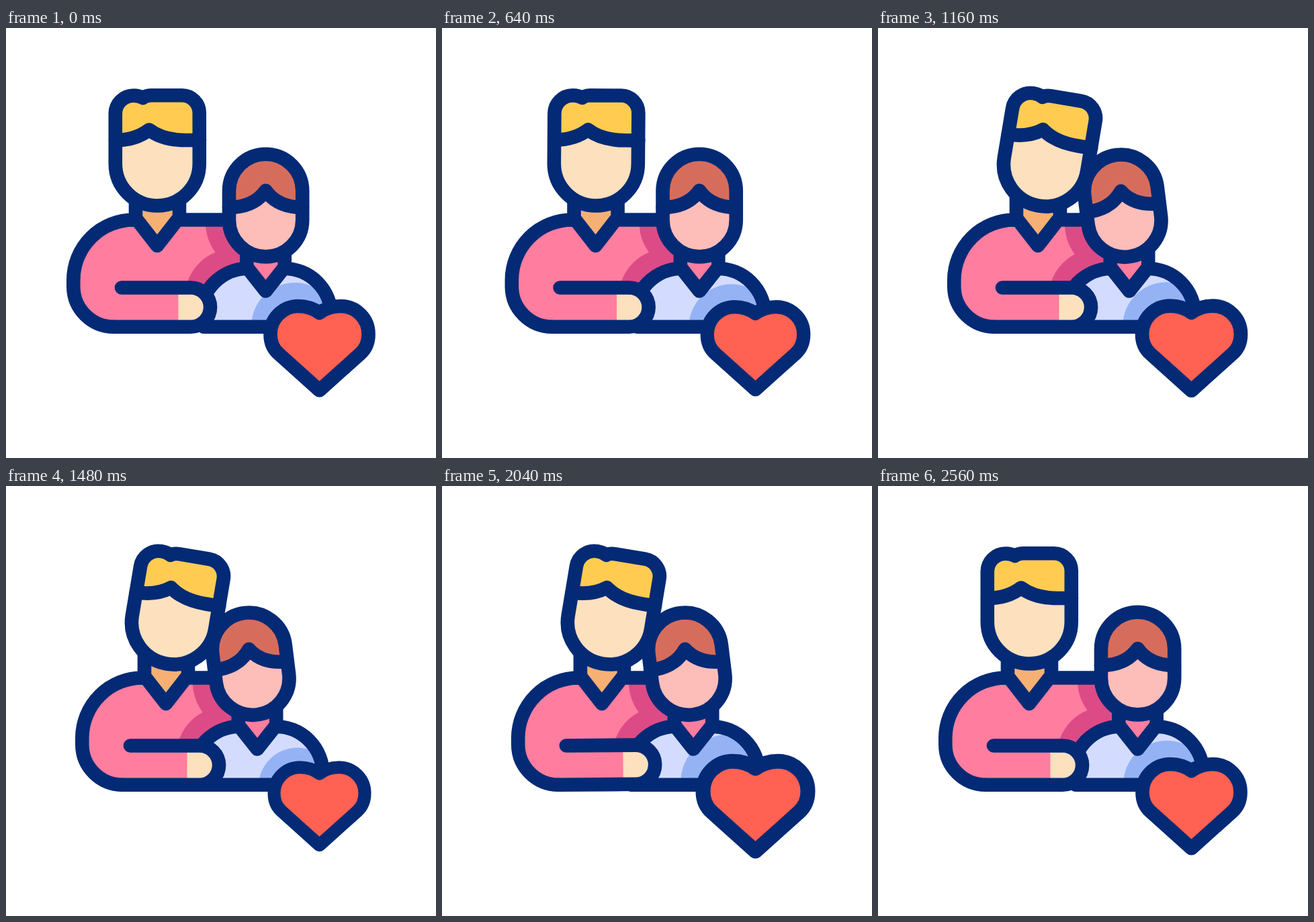
Animation of 640 by 640 pixels, one loop 3 s. Source, as an HTML page:

```html
<!DOCTYPE html>
<html lang="en">
<head>
<meta charset="utf-8">
<title>Hug</title>
<style>
  html, body { margin: 0; width: 100%; height: 100%; overflow: hidden; background: #fff; }
  svg { display: block; width: 100%; height: 100%; }
  .line { fill: none; stroke: #042a75; stroke-width: 20.6; stroke-linecap: round; stroke-linejoin: round; }
  .pink { fill: #ff7d9f; }
  .shade { fill: #dd4b86; }
  .skin { fill: #fde0bd; }
</style>
</head>
<body>
<svg viewBox="0 0 640 640">
  <defs>
    <path id="shirt" d="M195 285.5H190A89.7 89.7 0 0 0 100.3 375V385A60 60 0 0 0 160.3 444.7H280V400H380V285.5H255L225 324Z"/>
    <path id="blouse" d="M294 444.7L290 428A70 70 0 0 1 359 358H360L386.5 391.5L413 358H414A70 70 0 0 1 484 428V444.7Z"/>
    <path id="manHeadShape" d="M162.8 202V128A27 27 0 0 1 190 100.6Q198 100.6 204 104Q208 100.6 216 100.3H262A26 26 0 0 1 287.8 127V202A62.5 62.5 0 0 1 162.8 202Z"/>
    <path id="childHeadShape" d="M332 242.3A54.6 54.6 0 0 1 441.2 242.3V285.8A54.6 54.6 0 0 1 332 285.8Z"/>
    <clipPath id="shirtClip"><use href="#shirt"/></clipPath>
    <clipPath id="blouseClip"><use href="#blouse"/></clipPath>
  </defs>

  <g id="man">
    <path fill="#f7b074" d="M193 255H258V286L225 324L193 286Z"/>
    <use href="#shirt" class="pink"/>
    <g clip-path="url(#shirtClip)">
      <g id="childShade" class="shade">
        <circle cx="340" cy="402" r="74"/>
        <circle id="headShade" cx="371" cy="290" r="74"/>
      </g>
    </g>
    <path class="line" d="M160.3 444.7A60 60 0 0 1 100.3 385V375A89.7 89.7 0 0 1 190 285.5H195L225 324L255 285.5H345M193 250V285.5M258 250V285.5"/>
    <g id="manHead">
      <use href="#manHeadShape" fill="#ffcc51"/>
      <path class="skin" d="M163 167Q193 167 213 151.5Q233 167 268 167H288V202A62.5 62.5 0 0 1 163 202Z"/>
      <path class="line" d="M163 167Q193 167 213 151.5Q233 167 268 167H288"/>
      <use href="#manHeadShape" class="line"/>
    </g>
  </g>

  <g id="child">
    <path class="pink" d="M358 325H415V358L386.5 391.5L358 358Z"/>
    <use href="#blouse" fill="#d3dcff"/>
    <g clip-path="url(#blouseClip)">
      <circle id="heartShade" cx="430" cy="444" r="65" fill="#95b3f4"/>
    </g>
    <use href="#blouse" class="line"/>
    <path class="line" d="M358.3 328V358M414.7 328V358"/>
    <g id="childHead">
      <use href="#childHeadShape" fill="#d66d5c"/>
      <path fill="#fdbdb9" d="M332 267Q369 267 386.5 242Q404 267 441 267V285.5A54.6 54.6 0 0 1 332 285.5Z"/>
      <path class="line" d="M332 267Q369 267 386.5 242Q404 267 441 267"/>
      <use href="#childHeadShape" class="line"/>
    </g>
  </g>

  <g id="arm">
    <path class="pink" d="M172 386.5H260V444.7H160.3Z"/>
    <path class="skin" d="M256.5 386.5H275A29.1 29.1 0 0 1 275 444.7H256.5Z"/>
    <path class="line" d="M172 386.5H275A29.1 29.1 0 0 1 275 444.7H160.3"/>
  </g>

  <g id="heart">
    <path class="line" style="fill:#ff6152" d="M466.5 424C457 417 447 414 435 414A41.5 41.5 0 0 0 393.5 456C393.5 468 398 478 406 485L466.5 539.3L527 485C535 478 539.5 468 539.5 456A41.5 41.5 0 0 0 498 414C486 414 476 417 466.5 424Z"/>
  </g>
</svg>
<script>
  const LOOP = 3000, STEP = 40;

  // Keys are [time, value] pairs, eased in and out between neighbours.
  const lean = [[0, 0], [360, 0], [1160, 1], [2015, 1], [2560, 0]];
  const manTilt = [[0, 0], [360, -3], [1160, 9.5], [2015, 9.5], [2560, 0]];
  const childTilt = [[0, 0], [360, 2.6], [1160, -7], [2015, -7], [2560, 0]];
  const armTilt = [[0, 0], [1960, 0], [2260, -3], [2560, 0]];
  const beat = [[0, 1], [400, 0.92], [940, 1.072], [1420, 0.92], [1980, 1.072], [2400, 1]];

  function valueAt(keys, t) {
    const next = keys.findIndex(([time]) => time > t);
    if (next < 0) return keys[keys.length - 1][1];
    const [t0, v0] = keys[next - 1], [t1, v1] = keys[next];
    return v0 + (v1 - v0) * (1 - Math.cos(Math.PI * (t - t0) / (t1 - t0))) / 2;
  }

  const move = x => `translate(${x} 0) `;
  const turn = (angle, x, y) => `rotate(${angle} ${x} ${y})`;
  const grow = s => `translate(466.5 477) scale(${s}) translate(-466.5 -477)`;
  const place = (id, transform) => document.getElementById(id).setAttribute('transform', transform);

  function draw(now) {
    const t = Math.floor(now % LOOP / STEP) * STEP;
    const manX = 13 * valueAt(lean, t), childX = -12.5 * valueAt(lean, t);
    const childTurn = turn(valueAt(childTilt, t), 386.5, 345);
    const scale = valueAt(beat, t);

    place('man', move(manX));
    place('manHead', turn(valueAt(manTilt, t), 225, 270));
    place('arm', move(manX) + turn(valueAt(armTilt, t), 172, 400));
    place('child', move(childX));
    place('childHead', childTurn);
    place('childShade', move(childX - manX));
    place('headShade', childTurn);
    place('heart', grow(scale));
    place('heartShade', move(-childX) + grow(1 + 1.4 * (scale - 1)));
  }

  let start;
  function tick(now) {
    start ??= now;
    draw(now - start);
    requestAnimationFrame(tick);
  }
  draw(0);
  requestAnimationFrame(tick);
</script>
</body>
</html>
```
